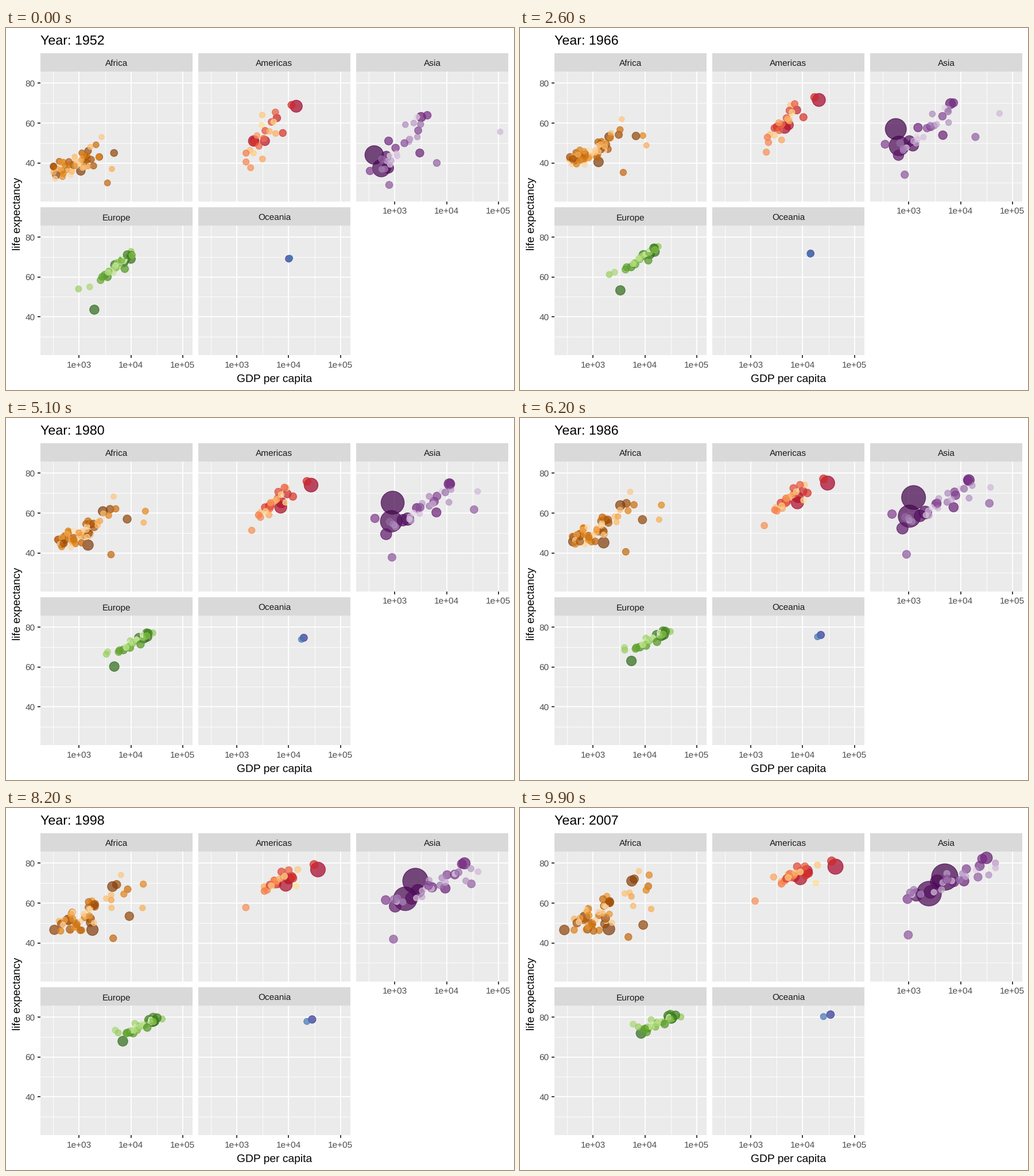
A matplotlib script that plays this animation: 885x632 px, repeating every 10000 ms.

```python
import numpy as np
import matplotlib.pyplot as plt
from matplotlib.animation import FuncAnimation
from matplotlib.colors import LinearSegmentedColormap
from matplotlib.patches import Rectangle

W, H, FRAMES = 885, 632, 100
PT = 0.72  # points per pixel at 100 dpi

plt.rcParams["font.family"] = "Liberation Sans"
plt.rcParams["text.hinting"] = "none"

# The dots that stand out: income and life span at the start, the same at the
# end, final population in millions, then optionally a midway income and life.
AFRICA = [
    (2449, 43, 6223, 72, 33), (3521, 30, 4797, 43, 12), (781, 39, 278, 46.5, 65),
    (1419, 42, 5581, 71, 80), (362, 34, 691, 53, 77), (1077, 36, 2014, 47, 135),
    (4293, 37, 13206, 57, 1.5, 17500, 55), (2388, 43, 12057, 74, 6, 18800, 60.5),
    (2719, 53, 7670, 76, 0.8), (4725, 45, 9270, 49, 44, 8400, 57),
]
AMERICAS = [
    (13990, 68.4, 42952, 78.2, 301), (2109, 51, 8989, 72.4, 190, 6900, 62.6),
    (3478, 51, 11978, 76, 109), (11367, 69, 36319, 81, 33), (5911, 62.5, 12779, 75, 40),
    (2144, 51, 7007, 73, 44), (7690, 55, 11416, 74, 26, 12000, 68),
    (1840, 37.6, 1202, 61, 8.5, 1950, 51), (3112, 42, 2749, 73, 5.7, 4200, 58.6),
    (3082, 64, 19329, 79, 3.9), (3023, 59, 18009, 70, 1.1),
]
ASIA = [
    (400, 44, 4959, 73, 1318, 870, 64.8), (547, 37.4, 2452, 64.7, 1110, 830, 55.5),
    (750, 37.5, 3541, 70.6, 223), (685, 43.4, 2606, 65.5, 169),
    (684, 37.5, 1391, 64, 150, 670, 49), (3217, 63, 31656, 82.6, 127),
    (3035, 45, 11606, 71, 70), (758, 51, 7458, 70.6, 65), (1031, 47.5, 23348, 78.6, 49),
    (331, 36, 944, 62, 48, 405, 57), (779, 29, 975, 44, 32),
    (6460, 40, 21655, 73, 28, 33700, 61.3), (2315, 60, 47143, 80, 4.6),
    (108382, 55.6, 47307, 77.6, 2.5, 40000, 70.5),
]
EUROPE = [
    (7144, 67.5, 32170, 79.4, 82), (1969, 43.6, 8458, 71.8, 71), (9980, 69, 33203, 79.4, 61),
    (4931, 66, 28570, 80.5, 58), (3145, 61, 10808, 72.5, 22, 9450, 69.5),
    (1601, 55, 5937, 76.4, 3.6), (974, 54, 7446, 75, 4.5), (10095, 72.7, 49357, 80, 4.6),
]
OCEANIA = [(10040, 69.1, 34435, 81.2, 20.4, 19200, 74.4),
           (10557, 69.4, 25185, 80.2, 4.1, 17400, 73.6)]


def crowd(n, seed, start, end, spread, pop):
    """Random dots along a slanted band that moves from start to end.

    A band is (low income, high income, low life span, high life span).
    """
    rng = np.random.default_rng(seed)
    u = (np.arange(n) + 0.5) / n
    rng.shuffle(u)

    def band(g_low, g_high, e_low, e_high, noise):
        v = np.clip(u + rng.normal(0, 0.12, n), 0, 1)
        income = g_low * (g_high / g_low) ** v
        return income, e_low + (e_high - e_low) * u + rng.uniform(-noise, noise, n)

    a, b = band(*start, spread[0]), band(*end, spread[1])
    people = pop[0] * (pop[1] / pop[0]) ** rng.random(n)
    return list(zip(*a, *b, people))


AFRICA += crowd(34, 4, (320, 1900, 36, 43), (430, 2200, 47, 57), (5, 7), (0.4, 38))
AFRICA += crowd(8, 9, (450, 2600, 38, 47), (2000, 12500, 50, 74), (4, 5), (0.6, 12))
AMERICAS += crowd(14, 3, (1500, 5600, 42, 63), (3600, 11000, 70, 78), (4, 1.5), (3, 20))
ASIA += crowd(19, 7, (560, 4300, 38, 61), (1000, 35000, 62, 80), (5, 3), (0.8, 60))
EUROPE += crowd(22, 2, (2600, 11500, 59.5, 71.5), (9500, 39000, 74, 81), (1.5, 1), (0.5, 40))


class Panel:
    def __init__(self, ax, name, left, top, rows, growth, pace, ramp):
        self.left, self.top, self.growth = left, top, growth
        ax.add_patch(Rectangle((left, top), 265.5, 31.6, fc="#D9D9D9", lw=0))
        ax.add_patch(Rectangle((left, top + 32), 265.5, 226.3, fc="#EBEBEB", lw=0))
        for shift, w in ((0.5, 0.94), (0, 1.87)):
            for k in range(3):
                x, y = self.x(3 + k - shift), self.y(40 + 20 * (k - shift))
                line(ax, [x, x], [top + 32, top + 258.3], "white", w)
                line(ax, [left, left + 265.5], [y, y], "white", w)
        label(ax, left + 132.7, top + 22.6, name, 15.45, "#1A1A1A")

        s = np.linspace(0, 1, 12)  # one key pose every five years
        tracks = []
        for g0, e0, g1, e1, _, *mid in rows:
            income = np.log10(g0) + np.log10(g1 / g0) * s ** pace[0]
            life = e0 + (e1 - e0) * s ** pace[1]
            if mid:
                bump = np.sin(np.pi * s)
                income += (np.log10(mid[0]) - income[5:7].mean()) * bump
                life += (mid[1] - life[5:7].mean()) * bump
            elif name == "Africa":
                life += 2.5 * np.sin(np.pi * s) * s
            tracks.append(np.column_stack([self.x(income), self.y(life)]))
        self.pos = np.array(tracks)
        self.pop = np.array([r[4] for r in rows])

        rank = np.argsort(np.argsort(-self.pop)) / (len(rows) - 1)
        colors = LinearSegmentedColormap.from_list(name, ramp)(rank)
        colors[:, 3] = 0.7
        self.dots = ax.scatter(*self.pos[:, 0].T, c=colors, edgecolors=colors,
                               linewidths=1.24 * PT, zorder=5)

    def x(self, log_income):
        return self.left + 67.6 + 90.2 * (log_income - 3)

    def y(self, age):
        return self.top + 51.7 + 3.4875 * (80 - age)

    def x_axis(self, ax):
        base = self.top + 258.3
        for d in (3, 4, 5):
            line(ax, [self.x(d)] * 2, [base, base + 4.8], "#333333", 1.87)
            label(ax, self.x(d), base + 21.2, f"1e+0{d}", 15.45, "#4D4D4D")

    def y_axis(self, ax):
        for age in (40, 60, 80):
            line(ax, [self.left - 4.8, self.left], [self.y(age)] * 2, "#333333", 1.87)
            label(ax, self.left - 9, self.y(age) + 5.7, str(age), 15.45, "#4D4D4D", ha="right")

    def show(self, t):
        i = min(int(t), 10)
        u = t - i
        self.dots.set_offsets(self.pos[:, i] * (1 - u) + self.pos[:, i + 1] * u)
        pop = self.pop * (1 + (self.growth - 1) * t / 11) / self.growth
        size = 2 + 10 * np.sqrt(np.clip(pop, 0.06, None) / 1318.6)
        width = 0.75 * (2.845 * size + 0.945) * 1.756
        self.dots.set_sizes((width * PT) ** 2)


def line(ax, xs, ys, color, w):
    ax.plot(xs, ys, color=color, lw=w * PT, solid_capstyle="butt", zorder=2)


def label(ax, x, y, text, px, color="black", ha="center", rotation=0):
    return ax.text(x, y, text, fontsize=px * PT, color=color, ha=ha, va="baseline",
                   rotation=rotation, rotation_mode="anchor")


fig = plt.figure(figsize=(W / 100, H / 100), dpi=100, facecolor="white")
ax = fig.add_axes([0, 0, 1, 1])
ax.axis("off")

COLS, TOP, LOW = (59.8, 334.7, 609.8), 44.4, 313.1
africa = Panel(ax, "Africa", COLS[0], TOP, AFRICA, 3.5, (1, 0.75),
               ["#7F3B08", "#B35806", "#E08214", "#FDB863", "#FEE0B6"])
americas = Panel(ax, "Americas", COLS[1], TOP, AMERICAS, 2.1, (0.8, 0.85),
                 ["#A50026", "#D73027", "#F46D43", "#FDAE61", "#FEE090"])
asia = Panel(ax, "Asia", COLS[2], TOP, ASIA, 2.5, (0.9, 0.8),
             ["#40004B", "#762A83", "#9970AB", "#C2A5CF", "#E7D4E8"])
europe = Panel(ax, "Europe", COLS[0], LOW, EUROPE, 1.35, (0.75, 0.8),
               ["#276419", "#4D9221", "#7FBC41", "#B8E186", "#E6F5D0"])
oceania = Panel(ax, "Oceania", COLS[1], LOW, OCEANIA, 2.3, (1, 1),
                ["#313695", "#4575B4"])
panels = [africa, americas, asia, europe, oceania]

for p in (europe, oceania, asia):
    p.x_axis(ax)
for p in (africa, europe):
    p.y_axis(ax)
label(ax, 467.3, 618.5, "GDP per capita", 19.3)
label(ax, 25, 324, "life expectancy", 19.3, rotation=90)
title = label(ax, COLS[0], 28.5, "", 23.2, ha="left")
ax.set_xlim(0, W)
ax.set_ylim(H, 0)


def update(frame):
    t = frame / 9
    title.set_text(f"Year: {round(1952 + 5 * t)}")
    for p in panels:
        p.show(t)
    return [title] + [p.dots for p in panels]


anim = FuncAnimation(fig, update, frames=FRAMES, interval=100, repeat=True)
plt.show()
```
